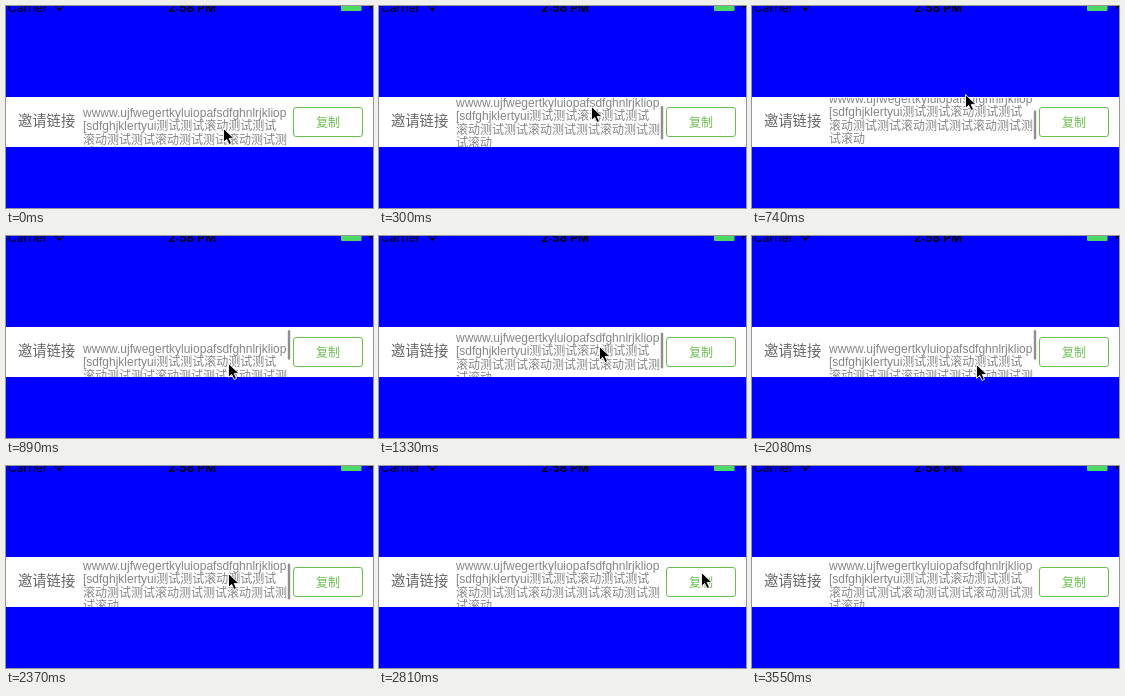
An HTML page that plays this animation: 367x202 px, repeating every 4050 ms.

```html
<!DOCTYPE html>
<html lang="zh">
<head>
<meta charset="utf-8">
<style>
  html, body { margin: 0; width: 100%; height: 100%; overflow: hidden; background: #00f; }
  svg { display: block; width: 367px; height: 202px; }
  text { font: 12px "Liberation Sans", "Noto Sans CJK SC", "Noto Sans CJK", sans-serif; white-space: pre; }
  #status text { font-family: Inter, sans-serif; }
</style>
</head>
<body>
<svg viewBox="0 0 367 202">
  <defs><clipPath id="view"><rect x="76" y="92" width="209" height="49"/></clipPath></defs>

  <g id="status">
    <text x="2" y="5.8">Carrier</text>
    <path d="M50.8 2.6Q53.2.6 55.6 2.6L53.2 5.2Z"/>
    <path d="M48.8.8Q53.2-2.4 57.6.8" fill="none" stroke="#000" stroke-width="1.5"/>
    <text x="186" y="5.8" text-anchor="middle" style="font-weight:600">2:58 PM</text>
    <rect x="335" y="-5" width="20.5" height="10" rx="1" fill="#4cd964"/>
    <path d="M362 0H367L363.4 4.5 364.2 1.2Z"/>
  </g>

  <rect y="91" width="367" height="50" fill="#fff"/>
  <text x="12" y="120.2" fill="#666" style="font-size:14.3px">邀请链接</text>
  <rect x="287.5" y="101.5" width="69" height="29" rx="2.5" fill="none" stroke="#6abf4e"/>
  <text x="322" y="120.6" fill="#6abf4e" text-anchor="middle">复制</text>

  <g clip-path="url(#view)">
    <g id="content" fill="#858585">
      <text x="77" y="111">wwww.ujfwegertkyluiopafsdfghnlrjkliop</text>
      <text x="77" y="124.3">[sdfghjklertyui测试测试滚动测试测试</text>
      <text x="77" y="137.6">滚动测试测试滚动测试测试滚动测试测</text>
      <text x="77" y="150.9">试滚动</text>
    </g>
  </g>
  <rect id="thumb" x="281.8" width="2.4" rx="1.2" fill="#8e8e8e"/>
  <path id="cursor" d="M.5.5V14.3L3.7 11.4 6 16.5 8.5 15.4 6.2 10.4H11Z" stroke="#fff" stroke-width=".9"/>
</svg>
<script>
  const LOOP = 4050, TICK = 148, MAX_SCROLL = 7;
  const start = { x: 217, y: 122, offset: 0 };
  // Each drag eases the pointer and the text to a new resting place.
  const drags = [
    { from: 0, to: 148, x: 211, y: 124, offset: 0 },
    { from: 225, to: 450, x: 213, y: 88, offset: -14 },
    { from: 740, to: 1030, x: 223, y: 132, offset: 9 },
    { from: 1110, to: 1480, x: 220, y: 108, offset: -6 },
    { from: 1630, to: 1930, x: 224, y: 131, offset: 8 },
    { from: 2060, to: 2370, x: 222, y: 107, offset: -7 },
    { from: 2670, to: 2810, x: 322, y: 106, offset: -7 }
  ];
  const [content, thumb, cursor] = ['content', 'thumb', 'cursor'].map(id => document.getElementById(id));
  const clamp = (v, low, high) => Math.max(low, Math.min(high, v));

  function poseAt(time) {
    return drags.reduce((pose, drag) => {
      const ease = 1 - (1 - clamp((time - drag.from) / (drag.to - drag.from), 0, 1)) ** 3;
      const mix = key => pose[key] + (drag[key] - pose[key]) * ease;
      return { x: mix('x'), y: mix('y'), offset: mix('offset') };
    }, start);
  }

  function move(node, x, y) {
    node.setAttribute('transform', `translate(${x} ${y})`);
  }

  function draw(now) {
    const t = now % LOOP;
    const time = Math.floor((t + 8) / TICK) * TICK;
    const { x, y, offset } = poseAt(time);
    move(cursor, Math.round(x), Math.round(y));
    cursor.setAttribute('opacity', t < 3550 ? 1 : 0);
    move(content, 0, Math.round(offset));

    // The thumb shrinks when the text is pulled past either end.
    const scroll = clamp(-offset, 0, MAX_SCROLL);
    const over = -offset - scroll;
    thumb.setAttribute('y', 94 + scroll / 2 + Math.max(0, over));
    thumb.setAttribute('height', 36 - Math.abs(over));
    thumb.setAttribute('opacity', time < 290 || time > 2800 ? 0 : time < 2660 ? 1 : 0.5);
    requestAnimationFrame(draw);
  }
  requestAnimationFrame(draw);
</script>
</body>
</html>
```
